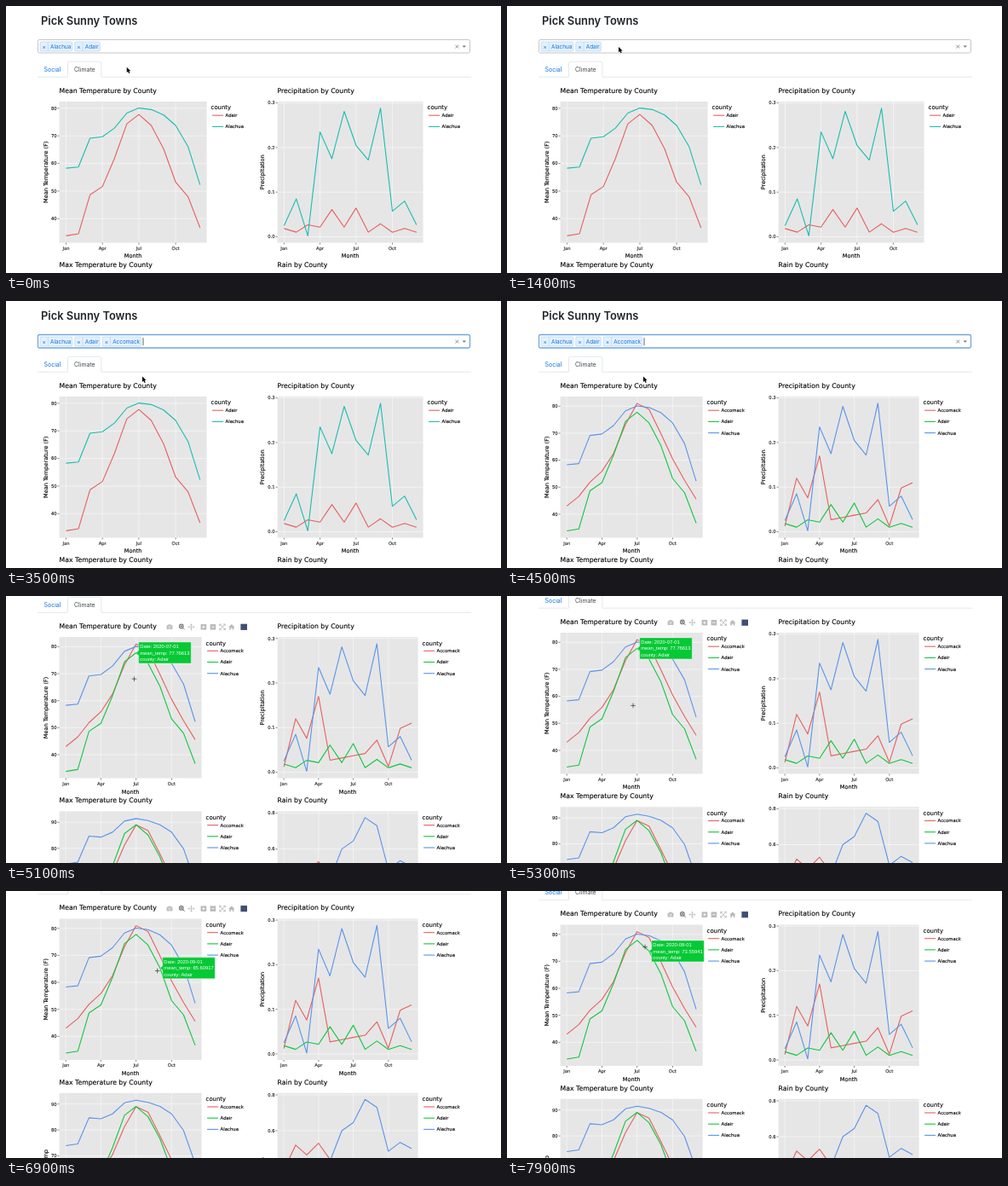
Write an HTML page that moves like this. It is 581 by 313 pixels and loops after 8 s.

```html
<!DOCTYPE html>
<html lang="en">
<head>
<meta charset="utf-8">
<title>County climate dashboard</title>
<style>
  html, body { margin: 0; width: 100%; height: 100%; overflow: hidden; background: #fff; }
  svg { display: block; }
  .ui { font-family: Inter, Roboto, sans-serif; }
  .plot { font-family: "DejaVu Sans", "Open Sans", sans-serif; }
  .plot text { stroke: #000; stroke-width: 0.12; }
  .tip { font-family: "Liberation Sans", Arial, sans-serif; }
</style>
</head>
<body>
<svg id="stage" width="581" height="313" viewBox="0 0 581 313"></svg>
<script>
const LOOP = 8000, STEP = 100;
const RED = '#e6605b', TEAL = '#1abdae', GREEN = '#12c63b', BLUE = '#5894e8';
const stage = document.getElementById('stage');

function add(parent, tag, attrs = {}, content) {
  const el = document.createElementNS('http://www.w3.org/2000/svg', tag);
  for (const key in attrs) el.setAttribute(key, attrs[key]);
  if (content !== undefined) el.textContent = content;
  parent.appendChild(el);
  return el;
}

// Text is placed by the middle of its capitals.
const label = (parent, x, cy, size, text, fill, more = {}) =>
  add(parent, 'text', { x, y: cy + size * 0.36, 'font-size': size, fill, ...more }, text);
const path = (parent, d, stroke, width, more = {}) =>
  add(parent, 'path', { d, stroke, 'stroke-width': width, fill: 'none', ...more });
const box = (parent, x, y, width, height, fill, more = {}) =>
  add(parent, 'rect', { x, y, width, height, fill, ...more });
const show = (el, on) => el.setAttribute('visibility', on ? 'inherit' : 'hidden');
const move = (el, x, y) => el.setAttribute('transform', `translate(${x} ${y})`);
const MIDDLE = { 'text-anchor': 'middle' }, END = { 'text-anchor': 'end' };

const page = add(stage, 'g');

// ---- Climate curves, each a function of the month 0 to 11 ----
const months = [...Array(12).keys()];
const yearDay = m => (Date.UTC(2020, m) - Date.UTC(2020, 0)) / 864e5;
const angle = m => (m - 6) * Math.PI / 6;

// Yearly cycle around July: cosine and sine terms of rising frequency.
const season = (cosines, sines) => m =>
  cosines.reduce((sum, a, n) => sum + a * Math.cos(n * angle(m)), 0) +
  sines.reduce((sum, b, n) => sum + b * Math.sin((n + 1) * angle(m)), 0);

// Straight lines between a few [month, value] points.
const through = (...points) => m => {
  const i = points.findIndex(p => p[0] >= m), b = points[i], a = points[i - 1] || b;
  return b[0] === m || a === b ? b[1] : a[1] + (b[1] - a[1]) * (m - a[0]) / (b[0] - a[0]);
};
const bump = (m, mid, width) => Math.exp(-(((m - mid) / width) ** 2));

const mean = {
  Accomack: season([60.1, 17.3, 1.9, 1.7], [2.3, 1.9]),
  Adair: season([54.96, 20.98, 0.75, 2.24, -0.85, -1.24, 0.92], [0.8, 0.2, 0, -1]),
  Alachua: season([69.7, 11.65, -2.26, 1.12, 0.77, -1.87, 0.98], [0.5, 2.24, -1.55])
};
const warmest = {
  Accomack: m => mean.Accomack(m) + 8,
  Adair: m => mean.Adair(m) + 11.3,
  Alachua: m => mean.Alachua(m) + 13.5 - 2.4 * Math.cos(angle(m - 0.9))
};
const precipitation = {
  Accomack: through([0, .012], [1, .12], [2, .076], [3, .17], [4, .027], [7, .042], [8, .072], [9, .013], [10, .098], [11, .11]),
  Adair: m => m % 2 ? 0.01 + 0.018 * bump(m, 4, 1.5) : 0.018 + 0.054 * bump(m, 5.1, 2.3),
  Alachua: through([0, .025], [1, .085], [2, .002], [3, .235], [4, .175], [5, .281], [6, .205], [7, .172], [8, .288], [9, .057], [10, .08], [11, .027])
};
const rain = {
  Accomack: through([0, .38], [1, .52], [2, .465], [3, .53], [5, .35], [7, .44], [11, .35]),
  Adair: () => 0.3,
  Alachua: through([4, .43], [5, .6], [6, .645], [7, .775], [8, .73], [9, .485], [10, .535], [11, .5])
};

// ---- Charts; a scale is a value, its y and the pixels per unit ----
const charts = [
  { title: 'Mean Temperature by County', axis: 'Mean Temperature (F)', col: 0, row: 0, data: mean,
    first: 40, step: 10, scales: [[80, 119.9, 3.235], [80, 123.3, 3.165]] },
  { title: 'Precipitation by County', axis: 'Precipitation', col: 1, row: 0, data: precipitation,
    first: 0, step: 0.1, scales: [[0, 270.5, 523], [0, 270.5, 523]] },
  { title: 'Max Temperature by County', axis: 'Max Temp', col: 0, row: 1, data: warmest,
    first: 60, step: 10, scales: [[90, 329.2, 3.04], [90, 329.2, 3.04]] },
  { title: 'Rain by County', axis: 'Rain', col: 1, row: 1, data: rain,
    first: 0.2, step: 0.2, scales: [[.8, 318.5, 210], [.8, 318.5, 210]] }
];

function layout(chart, view) {
  const { col, row } = chart, [value, base, unit] = chart.scales[view];
  const left = 62.6 + 256 * col, top = 112 + 204.3 * row;
  const width = 173 - 2 * col - 6 * view, span = width / 1.1;
  return {
    left, top, width, height: 165.5,
    x: m => left + span * (0.05 + yearDay(m) / 335),
    y: v => base - (v - value) * unit
  };
}

function drawChart(parent, chart, view, colors) {
  const { left, top, width, height, x, y } = layout(chart, view);
  const right = left + width, bottom = top + height;

  label(parent, left, top - 12.8, 7.72, chart.title, '#000');
  box(parent, left, top, width, height, '#e6e6e7');
  for (let i = 0; i < 5; i++) {
    const v = chart.first + i * chart.step, ty = y(v);
    if (ty < top) break;
    path(parent, `M${left} ${ty}H${right}`, '#fff', 0.5);
    path(parent, `M${left - 2} ${ty}H${left}`, '#333', 0.6);
    label(parent, left - 3, ty, 5.25, v.toFixed(chart.col), '#333', END);
  }
  ['Jan', 'Apr', 'Jul', 'Oct'].forEach((name, i) => {
    const tx = x(3 * i);
    path(parent, `M${tx} ${top}V${bottom}`, '#fff', 0.5);
    path(parent, `M${tx} ${bottom}v2`, '#333', 0.6);
    label(parent, tx, bottom + 6.3, 5.25, name, '#333', MIDDLE);
  });
  label(parent, left + width / 2, bottom + 15.6, 6.57, 'Month', '#000', MIDDLE);
  const ax = left - 15.8 - 1.8 * chart.col, ay = top + height / 2;
  label(parent, ax, ay, 6.57, chart.axis, '#000', { ...MIDDLE, transform: `rotate(-90 ${ax} ${ay})` });

  label(parent, right + 5, top + 7, 6.9, 'county', '#000');
  Object.keys(colors).forEach((name, i) => {
    const ly = top + 16.2 + i * 13.2;
    path(parent, `M${right + 6.5} ${ly}h13`, colors[name], 1.1);
    label(parent, right + 22, ly, 5.35, name, '#000');
    const points = months.map(m => `${x(m).toFixed(2)} ${y(chart.data[name](m)).toFixed(2)}`);
    path(parent, 'M' + points.join('L'), colors[name], 1.1, { 'stroke-linejoin': 'round' });
  });
}

const views = [{ Adair: RED, Alachua: TEAL }, { Accomack: RED, Adair: GREEN, Alachua: BLUE }]
  .map((colors, view) => {
    const g = add(page, 'g', { class: 'plot' });
    charts.forEach(chart => drawChart(g, chart, view, colors));
    return g;
  });

// ---- Chart toolbar ----
const bar = add(page, 'g');
const ICON = '#b9b9bd', ACTIVE = '#77777d';
box(bar, 188.6, 98.2, 6.8, 4.8, ICON, { rx: 0.8 });
box(bar, 190.5, 97.2, 3, 2, ICON);
add(bar, 'circle', { cx: 192, cy: 100.6, r: 1.3, fill: ICON, stroke: '#fff', 'stroke-width': 0.6 });
add(bar, 'circle', { cx: 205.8, cy: 99.4, r: 2.3, fill: 'none', stroke: ACTIVE, 'stroke-width': 1.2 });
path(bar, 'M207.5 101.1l2.2 2.2M204.6 99.4h2.4M205.8 98.2v2.4', ACTIVE, 1);
for (const turn of [0, 90, 180, 270]) {
  path(bar, 'M217.5 100.2v-3.5m-1.2 1.2l1.2-1.2 1.2 1.2', ICON, 0.8, { transform: `rotate(${turn} 217.5 100.2)` });
  path(bar, 'M254 100.2l3-3.2M255.2 96.8h2v2.2', ICON, 0.9, { transform: `rotate(${turn} 254 100.2)` });
}
for (const [bx, sign] of [[228.6, 'M1.6 3.2h3.4M3.3 1.5v3.4'], [239.6, 'M1.6 3.2h3.4']]) {
  box(bar, bx, 97, 6.6, 6.4, ICON);
  move(path(bar, sign, '#fff', 0.9), bx, 97);
}
path(bar, 'M261.2 100.4l3.6-3.5 3.6 3.5h-1v3h-1.7v-2h-1.8v2h-1.7v-3z', 'none', 0, { fill: ICON });
box(bar, 275.4, 96.6, 7.6, 7.2, '#3f4f75');

// ---- Header, select box and tabs ----
const ui = add(page, 'g', { class: 'ui' });
label(ui, 41, 17.6, 12.9, 'Pick Sunny Towns', '#212529', { 'font-weight': 600 });

const field = box(ui, 37.5, 39.5, 507, 15.5, '#fff', { rx: 1.8 });
const CHIP_TEXT = '#1272dc', CHIP_EDGE = '#b4d6f7';
function chip(x, width, name) {
  const g = add(ui, 'g');
  box(g, x, 42, width, 11, '#e3f0fd', { rx: 1, stroke: CHIP_EDGE, 'stroke-width': 0.7 });
  path(g, `M${x + 9.3} 42v11`, CHIP_EDGE, 0.7);
  label(g, x + 4.7, 47.6, 6.6, '×', CHIP_TEXT, MIDDLE);
  label(g, x + 12, 47.6, 6.4, name, CHIP_TEXT);
  return g;
}
chip(40, 37.6, 'Alachua');
chip(80.8, 29.4, 'Adair');
const newChip = chip(113.2, 45.3, 'Accomack');
const caret = path(ui, 'M0 43.2v9', '#222', 0.7);
path(ui, 'M527.4 45.7l3.8 3.8M531.2 45.7l-3.8 3.8', '#777', 0.8);
const arrow = path(ui, 'M-2.3 -1.1h4.6l-2.3 2.3z', 'none', 0, { fill: '#777' });

path(ui, 'M37 83.2H72.5V67.2q0-2 2-2H109.8q2 0 2 2V83.2H546', '#dee2e6', 0.8);
label(ui, 44.6, 74, 6.95, 'Social', '#0b6fe6');
label(ui, 80, 74, 6.95, 'Climate', '#40464c');

// ---- Option list ----
const menu = add(ui, 'g');
box(menu, 37.5, 55, 507, 90.4, '#fff', { stroke: '#c8c8c8', 'stroke-width': 0.8 });
const focus = box(menu, 38, 0, 506, 16, '#e2edfc');
const list = add(menu, 'svg', { x: 0, y: 55.4, width: 581, height: 89.6, viewBox: '0 55.4 581 89.6', overflow: 'hidden' });
['Abbeville', 'Acadia', 'Accomack', 'Ada', 'Adams', 'Addison']
  .forEach((name, i) => label(list, 41.3, 63.3 + 16 * i, 6.9, name, '#222'));

// ---- Hover label ----
const tip = add(page, 'g', { class: 'tip' });
path(tip, 'M0 0L3 -2.4V-12.5H64.6V12.5H3V2.4Z', '#fff', 0.4, { fill: '#06c935' });
const tipLines = [-7.6, 0, 7.6].map(y => label(tip, 4.6, y, 5.84, '', '#fff'));
const readings = { 6: '77.76613', 7: '73.55941', 8: '65.60917' };
const hoverChart = layout(charts[0], 1);

// ---- Pointer ----
const pointer = add(stage, 'g');
const arrowhead = path(pointer, 'M0 0V6.3L1.5 5 2.5 7.3 3.7 6.8 2.7 4.5H4.6Z', '#fff', 0.8,
  { fill: '#000', 'paint-order': 'stroke' });
const cross = path(pointer, 'M-2.8 0h5.6M0 -2.8v5.6', '#333', 0.7);

// ---- Timeline; a move is its start, its end and where it leads ----
const pointerMoves = [
  [200, 1000, 131, 48], [2100, 2700, 160, 88.6], [4500, 4950, 153, 66], [4950, 5250, 148, 128.4],
  [5500, 6400, 157, 70], [6400, 6850, 177.7, 93.6], [7300, 7800, 162, 65.6]
];
const scrollMoves = [[4600, 5200, 69], [5500, 6200, 79.5], [7200, 7800, 72.5]];
const OPEN = 2000, PICK = 3300, REDRAW = 4100, HOVER = 4800;

function ease(t, start, end) {
  const p = Math.min(1, Math.max(0, (t - start) / (end - start)));
  return p * p * (3 - 2 * p);
}
const follow = (from, moves, t) => moves.reduce(
  (at, [start, end, ...to]) => at.map((v, i) => v + (to[i] - v) * ease(t, start, end)), from);

function render(t) {
  const open = t >= OPEN && t < PICK, picked = t >= PICK, hover = t >= HOVER;
  const [px, py] = follow([141.7, 71.8], pointerMoves, t);
  const [scroll] = follow([0], scrollMoves, t);
  move(page, 0, -scroll);
  move(pointer, px, py);
  show(arrowhead, !hover);
  show(cross, hover);
  show(bar, hover);
  show(views[0], t < REDRAW);
  show(views[1], t >= REDRAW);

  show(menu, open);
  show(newChip, picked);
  field.setAttribute('stroke', picked ? '#72a7de' : '#c0c0c4');
  field.setAttribute('stroke-width', picked ? 1.3 : 0.9);
  focus.setAttribute('y', 55.2 + 16 * Math.max(0, Math.floor((py - 55) / 16)));
  arrow.setAttribute('transform', `translate(537.8 47.6) scale(1 ${open ? -1 : 1})`);
  const blink = Math.floor((t - (picked ? PICK : OPEN)) / 500) % 2 === 0;
  show(caret, t >= OPEN && blink);
  move(caret, picked ? 161 : 113, 0);

  // The label belongs to the month nearest to the pointer.
  const { x, y } = hoverChart, gap = m => Math.abs(x(m) - px);
  const month = months.reduce((best, m) => gap(m) < gap(best) ? m : best);
  show(tip, hover && month in readings);
  move(tip, x(month), y(mean.Adair(month)));
  [`Date: 2020-0${month + 1}-01`, `mean_temp: ${readings[month]}`, 'county: Adair']
    .forEach((text, i) => { tipLines[i].textContent = text; });
}

const start = performance.now();
function tick() {
  const t = (performance.now() - start) % LOOP;
  render(Math.floor(t / STEP) * STEP);
  requestAnimationFrame(tick);
}
tick();
</script>
</body>
</html>
```
